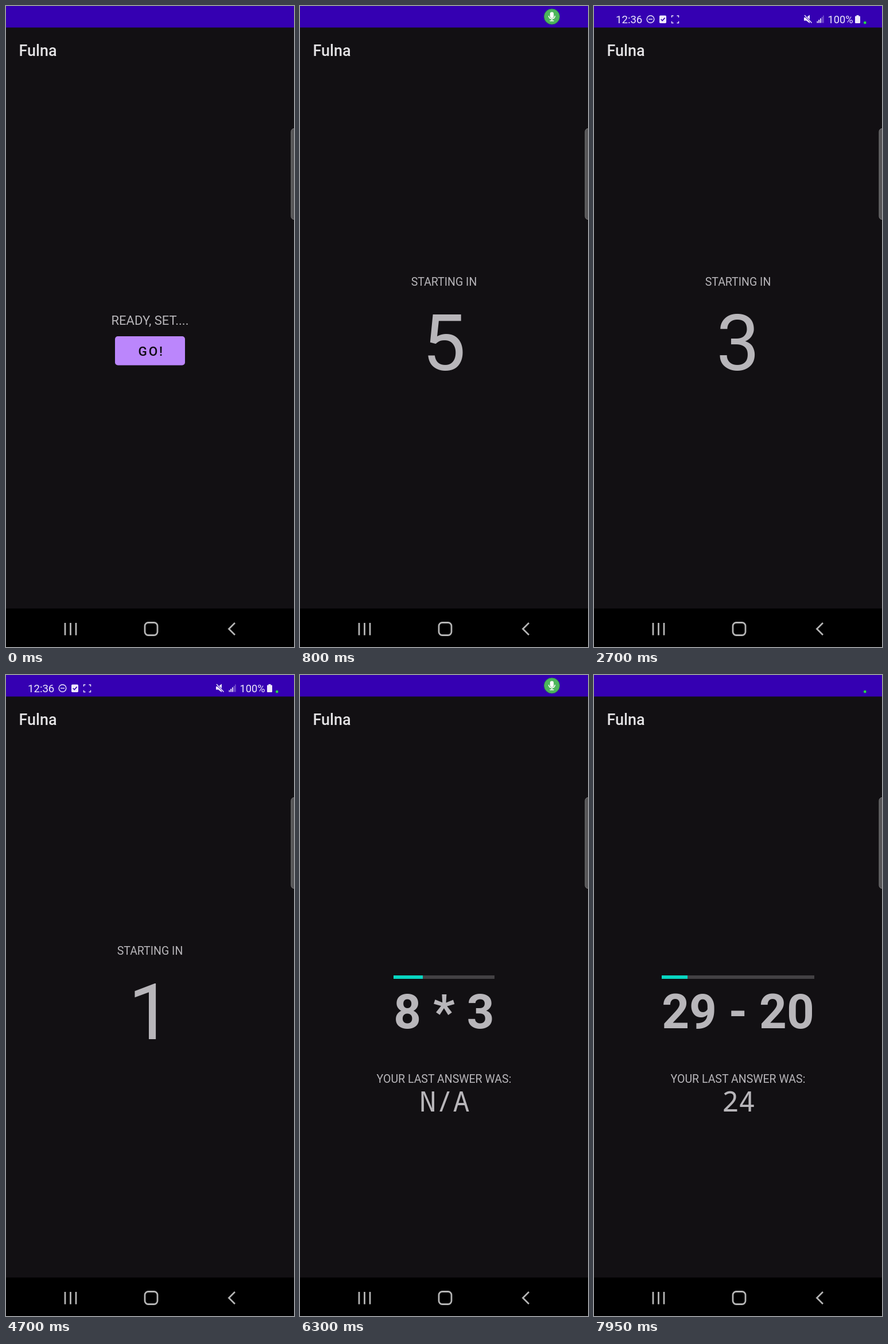
Animation, 502 px wide and 1116 px high, one loop 8000 ms. Source, as an HTML page:

```html
<!DOCTYPE html>
<html lang="en">
<head>
<meta charset="utf-8">
<title>Mental arithmetic app</title>
<style>
html, body { margin: 0; width: 100%; height: 100%; overflow: hidden; background: #121013; }
svg { display: block; width: 100%; height: 100%; font-family: Roboto, sans-serif; }
.mid { text-anchor: middle; fill: #b8b6ba; }
.small { font-size: 19.5px; }
.line { fill: none; stroke: currentColor; stroke-width: 1.4; }
.nav { fill: none; stroke: #b5b5b5; stroke-width: 2.8; }
</style>
</head>
<body>
<svg viewBox="0 0 502 1116">
  <rect width="502" height="1116" fill="#121013"/>
  <rect width="502" height="37.5" fill="#3500b2"/>
  <text x="22.5" y="87" font-size="27" font-weight="500" fill="#e3e2e4">Fulna</text>
  <rect x="497" y="213.5" width="12" height="158" rx="5" fill="#565557" stroke="#7b7a7b"/>

  <g id="status" fill="currentColor">
    <text x="38" y="29.5" font-size="18.6">12:36</text>
    <circle class="line" cx="98.5" cy="23" r="6.3"/>
    <path class="line" d="M95 23h7"/>
    <rect x="114" y="16.5" width="12" height="13.5" rx="1.8"/>
    <path d="M116.8 23l2.4 2.6 4.4-5" fill="none" stroke="#3500b2" stroke-width="1.6"/>
    <g id="rec">
      <path class="line" d="M135.5 20v-3h3M144.500 17h3v3M147.500 26.500v3h-3M138.500 29.500h-3v-3"/>
      <path id="cam" d="M137 19.500h6.500v2.500l3.500-2.500v7.500l-3.500-2.500v2.500h-6.500z"/>
    </g>
    <path d="M366 20h4l6-4.500v14.500l-6-4.500h-4z"/>
    <path d="M366.500 16l13 13" stroke="#3500b2" stroke-width="3"/>
    <path class="line" d="M367 16l12.500 13.500"/>
    <path d="M388.500 26.500h1.800v3h-1.800zM391.300 24h1.800v5.500h-1.800zM394.100 21.500h1.800v8h-1.800z"/>
    <path d="M396.900 19h1.500v10.500h-1.500zM399.200 16.500h1.300v13h-1.300z" opacity=".45"/>
    <text x="407.500" y="29.500" font-size="18.300">100%</text>
    <path d="M457.500 16h4v1.500h1.500q1 0 1 1v10.500q0 1-1 1h-7q-1 0-1-1v-10.500q0-1 1-1h1.500z"/>
  </g>
  <circle id="dot" cx="472.300" cy="29" r="2.500" fill="#2fe04c" stroke="#1c4a6e" stroke-width=".8"/>
  <g id="chip">
    <rect id="pill" fill="#4db65c" stroke="#2f8a4e"/>
    <g id="mic" fill="#fff">
      <rect x="-3.200" y="-8" width="6.400" height="10.500" rx="3.200"/>
      <path d="M-5.500 -1.500a5.500 5.500 0 0 0 11 0M0 4v3M-3.500 7.300h7" fill="none" stroke="#fff" stroke-width="1.500"/>
    </g>
  </g>

  <g id="start">
    <text class="mid" x="251" y="555" font-size="22">READY, SET....</text>
    <clipPath id="shape"><rect x="190" y="575" width="122" height="50.500" rx="5"/></clipPath>
    <g clip-path="url(#shape)">
      <rect x="190" y="575" width="122" height="51" fill="#bb86fc"/>
      <circle id="ripple" cx="251" cy="600" opacity=".2"/>
    </g>
    <text x="230.500" y="609" font-size="22.500" font-weight="500" letter-spacing="2.800" fill="#0d0a12">GO!</text>
  </g>

  <g id="countdown">
    <text class="mid small" x="251" y="487">STARTING IN</text>
    <text class="mid" id="count" x="251" y="634" font-size="134.500"></text>
  </g>

  <g id="quiz">
    <rect id="track" y="523" height="6" fill="#434144"/>
    <rect id="bar" y="523" height="6" fill="#08d6c1"/>
    <text class="mid" id="sum" x="251" y="615" font-size="83.500" font-weight="700"></text>
    <text class="mid small" x="251" y="709.500">YOUR LAST ANSWER WAS:</text>
    <text class="mid" id="answer" x="252" y="760" font-size="48.500" style="font-family:'Noto Sans Mono',monospace"></text>
  </g>

  <rect y="1049" width="502" height="67"/>
  <path class="nav" d="M103 1074v21.500M112.500 1074v21.500M122 1074v21.500M399 1074l-10.500 10.500 10.500 10.500"/>
  <rect class="nav" x="242" y="1073.500" width="22" height="22" rx="6"/>
</svg>
<script>
const LOOP = 8000, QUIZ = 5430, NEXT = 7443, ROUND = 3000, MIC_AGAIN = 5750;
const $ = id => document.getElementById(id);
const set = (id, attrs) => { for (const k in attrs) $(id).setAttribute(k, attrs[k]); };
const show = (id, alpha) => set(id, { opacity: +alpha });
const mix = (a, b, p) => a + (b - a) * p;
const ramp = (t, from, to) => Math.min(1, Math.max(0, (t - from) / (to - from)));
const ease = p => p * p * (3 - 2 * p);

function drawStatus(t) {
  const fade = 1 - ramp(t, 5450, 5650);
  const residue = t >= 5640 && t < 5750;
  show('status', t < 2250 || t >= 5750 ? 0 : residue ? 1 : t < 2400 ? 0.85 : fade);
  $('status').style.color = residue ? '#2e00a0' : '#eee8fb';
  show('rec', !residue);
  show('cam', (t - 2200) % 1000 < 500);
  show('dot', t >= 7700 ? 1 : t >= 1950 ? fade : 0);
}

// The microphone badge slides in, rests, then shrinks into the dot.
function drawChip(t) {
  const s = t < MIC_AGAIN ? t : t - MIC_AGAIN;
  const come = ease(ramp(s, 0, 300)), go = ease(ramp(s, 1700, 1950));
  const size = mix(27, 5, go);
  const x = mix(mix(463, 425.5, come), 469.8, go), y = mix(5, 26.5, go);
  show('chip', s < 1950 ? come : 0);
  set('pill', { x, y, width: size, height: size, rx: size / 2 });
  set('mic', { transform: `translate(${x + size / 2} ${y + size / 2}) scale(${size / 27})`, opacity: 1 - go });
}

function drawQuiz(t) {
  const second = t >= NEXT;
  const width = second ? 266 : 176, x = 251 - width / 2;
  set('track', { x, width });
  set('bar', { x, width: width * ramp(t - (second ? NEXT : QUIZ), 0, ROUND) });
  $('sum').textContent = second ? '29 - 20' : '8 * 3';
  $('answer').textContent = second ? '24' : 'N/A';
  show('quiz', t >= QUIZ);
}

function draw(now) {
  const t = now % LOOP;
  const enter = ramp(t, 350, 550);
  show('start', 1 - enter);
  set('ripple', { r: 75 * ease(ramp(t, 20, 300)) });
  show('countdown', t < QUIZ ? enter : 0);
  $('count').textContent = 5 - Math.min(4, Math.max(0, Math.floor((t - 400) / 1000)));
  drawStatus(t);
  drawChip(t);
  drawQuiz(t);
}

const began = performance.now();
function tick() {
  draw(performance.now() - began);
  requestAnimationFrame(tick);
}
tick();
</script>
</body>
</html>
```
